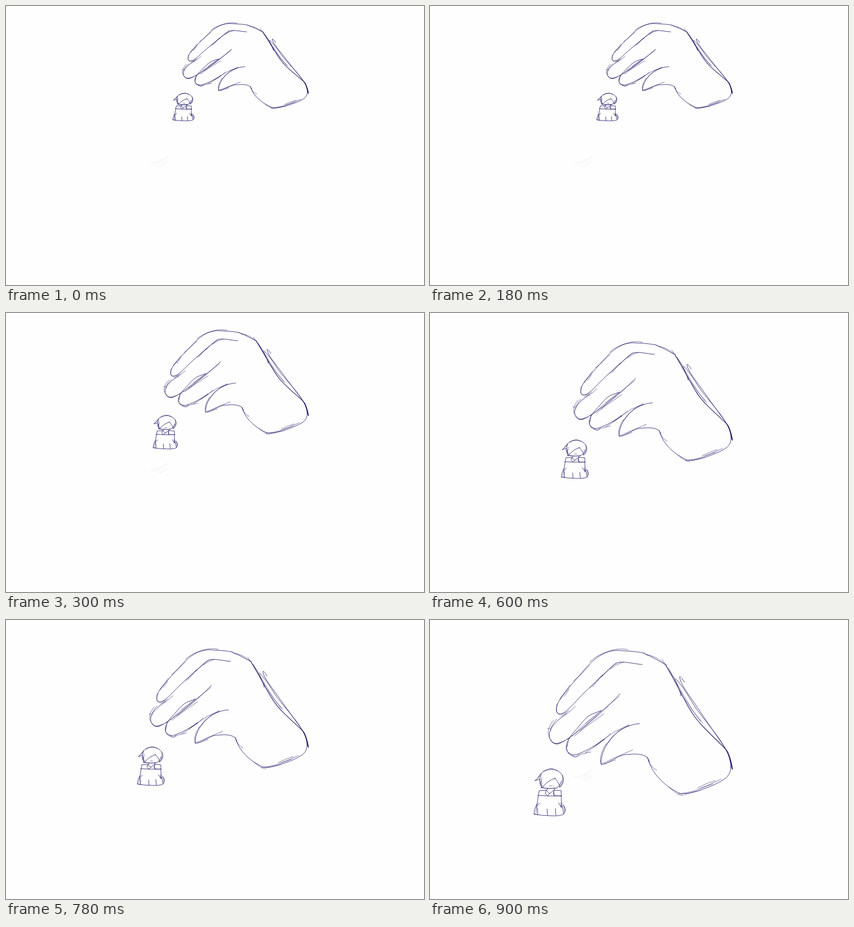
Recreate the animation shown at these times as an HTML page. Size 800 by 533 pixels, loop 1200 ms.

```html
<!DOCTYPE html>
<html lang="en">
<head>
<meta charset="utf-8">
<title>Hand and figure</title>
<style>
  html, body { margin: 0; width: 100%; height: 100%; overflow: hidden; background: #fefefe; }
  svg { display: block; width: 100vw; height: 100vh; }
  path { fill: none; stroke-linecap: round; stroke-linejoin: round; }
  #sketch path { stroke: #1d1765; stroke-width: .85; vector-effect: non-scaling-stroke; }
  #sketch .light { stroke-width: .6; }
  #sketch .bold { stroke-width: 1.1; }
  #sketch .body { fill: #fefefe; stroke: none; }
  #smudge { stroke: #f8f8f8; stroke-width: 3; }
</style>
</head>
<body>
<svg viewBox="0 0 800 533">
  <path id="smudge" d="M277 301L286 298M288 301Q298 293 310 288M293 305Q300 304 308 298M296 298L303 292"/>

  <g id="sketch">
    <!-- back of the hand and first finger -->
    <path d="M249 152C257 139 279 114 298 92C315 73 332 60 356 58C377 59 395 60 408 63C425 70 440 79 453 87"/>
    <path class="light" d="M306 80C320 66 341 59 356 56C366 55 374 55 379 57M274 117L289 104L306 86
      M415 66Q433 70 443 79L453 86M408 62L417 68M256 141L268 124M257 146L266 132"/>
    <path d="M257 140C247 151 241 165 242 174C244 181 251 181 258 176C269 168 281 153 296 138C313 122 336 99 357 82"/>
    <path d="M328 109C340 96 352 84 360 81C376 79 390 84 406 85"/>
    <path class="light" d="M243 160Q240 177 246 180Q255 181 266 173M306 130L328 107M311 128L331 104M345 94L358 85L371 80"/>

    <!-- second finger -->
    <path d="M262 179C247 188 233 201 229 214C227 226 231 234 240 236C249 236 258 230 268 225"/>
    <path class="light" d="M237 191C227 202 223 216 229 226M243 189Q230 203 231 212M230 207L225 208
      M231 228Q236 239 246 237L258 231M234 234Q243 239 252 233M250 184L266 176L278 165"/>
    <path d="M262 228C283 214 307 194 327 177C343 163 354 150 364 141"/>
    <path class="light" d="M272 222C287 207 302 193 328 173M276 222L301 202L333 179M298 198L322 179L362 146M287 212L321 182"/>

    <!-- third finger -->
    <path d="M281 208C292 194 301 183 312 179L328 173M280 209C268 221 259 236 261 247C264 256 273 259 281 257C300 250 319 239 333 227"/>
    <path class="light" d="M262 237Q260 254 268 256M265 228L263 242M264 254Q273 263 281 261L291 256L308 252
      M271 258L279 262L286 256M297 254Q325 237 346 216M318 239Q343 221 354 213L381 201M313 242L333 229"/>

    <!-- fourth finger and web -->
    <path d="M401 198C382 199 364 209 350 222C336 237 328 256 327 273C328 279 338 274 350 267C361 261 367 257 378 257C394 255 407 256 415 262Q419 266 420 271"/>
    <path class="light" d="M337 236Q326 255 326 267L328 277M327 275L337 271L354 263L388 248M333 275L356 267M337 240L350 223L364 209L381 200"/>

    <!-- heel of the hand -->
    <path d="M416 262C420 276 427 291 439 303C450 315 464 325 480 332C494 333 512 327 526 322C544 315 557 309 566 302C575 294 577 284 575 271Q574 261 570 252"/>
    <path class="light" d="M418 268Q423 282 434 287M457 319Q468 329 477 334L485 335M475 332Q494 330 507 326L536 314L557 304
      M512 321Q528 312 545 307M518 322L541 313M488 333L518 325"/>

    <!-- wrist -->
    <path class="bold" d="M452 88C464 108 475 129 487 152C498 174 509 190 523 204C540 222 556 236 566 247C574 257 577 271 579 285"/>
    <path d="M470 112C486 128 497 151 510 170C530 197 547 216 559 235C569 252 576 267 579 285"/>
    <path d="M487 119C482 110 476 104 478 111C481 125 497 145 509 163C527 190 550 223 570 252L578 284"/>
    <path class="light" d="M444 75L454 91L470 115L481 145M467 114L482 143L503 174L522 197M456 91L482 138L501 170L518 194M480 137L480 145M575 268L576 282L579 285"/>

    <!-- figure -->
    <path class="body" d="M212 295Q220 285 233 285Q255 288 255 306Q252 320 240 322L239 326L251 327L252 352L259 360L256 372Q229 377 200 371L208 327L222 325L212 319L209 307Z"/>
    <path d="M201 307Q207 303 211 295Q219 285 233 284Q247 287 253 296Q259 307 251 317L247 319M201 307L207 305L211 304M213 294Q206 309 214 320"/>
    <path d="M240 302Q226 306 216 319M238 302Q246 308 249 320M212 307Q211 317 216 321M252 307Q249 317 242 321"/>
    <path class="light" d="M206 301L212 297M217 290Q231 281 244 288M253 296Q256 306 250 317M214 301L213 313L217 319M228 317L233 317"/>
    <path class="bold" d="M212 320Q226 323 242 321"/>
    <path d="M225 322L223 327M238 322L238 326M222 325L229 332L237 325M221 327L221 332L225 336L229 331M237 326L236 333L240 336"/>
    <path d="M222 325L209 326Q207 337 205 352M238 325L251 326Q251 342 252 358M206 335Q228 337 252 336M210 350Q204 354 204 360M246 349L251 358M251 349L251 357"/>
    <path d="M204 352Q200 360 199 371Q216 374 232 374Q248 375 256 371L259 364Q260 360 254 352M206 360L206 371M224 361L225 373M240 360L241 373M253 355L256 370"/>
    <path class="light" d="M205 351L203 368M256 354L258 366M199 370L207 372M237 328L238 336L252 336"/>
  </g>
</svg>
<script>
  // Each pose scales the drawing about the wrist corner: [y, scaleX, scaleY]
  const poses = [
    [167, .684, .588],
    [196, .783, .715],
    [243, .862, .82],
    [285, 1, 1]
  ];
  const hold = 300;
  const anchor = { x: 579, y: 285 };
  const sketch = document.getElementById('sketch');

  function draw() {
    const step = Math.floor(performance.now() / hold) % poses.length;
    const [y, sx, sy] = poses[step];
    sketch.setAttribute('transform',
      `translate(${anchor.x} ${y}) scale(${sx} ${sy}) translate(${-anchor.x} ${-anchor.y})`);
    requestAnimationFrame(draw);
  }
  draw();
</script>
</body>
</html>
```
